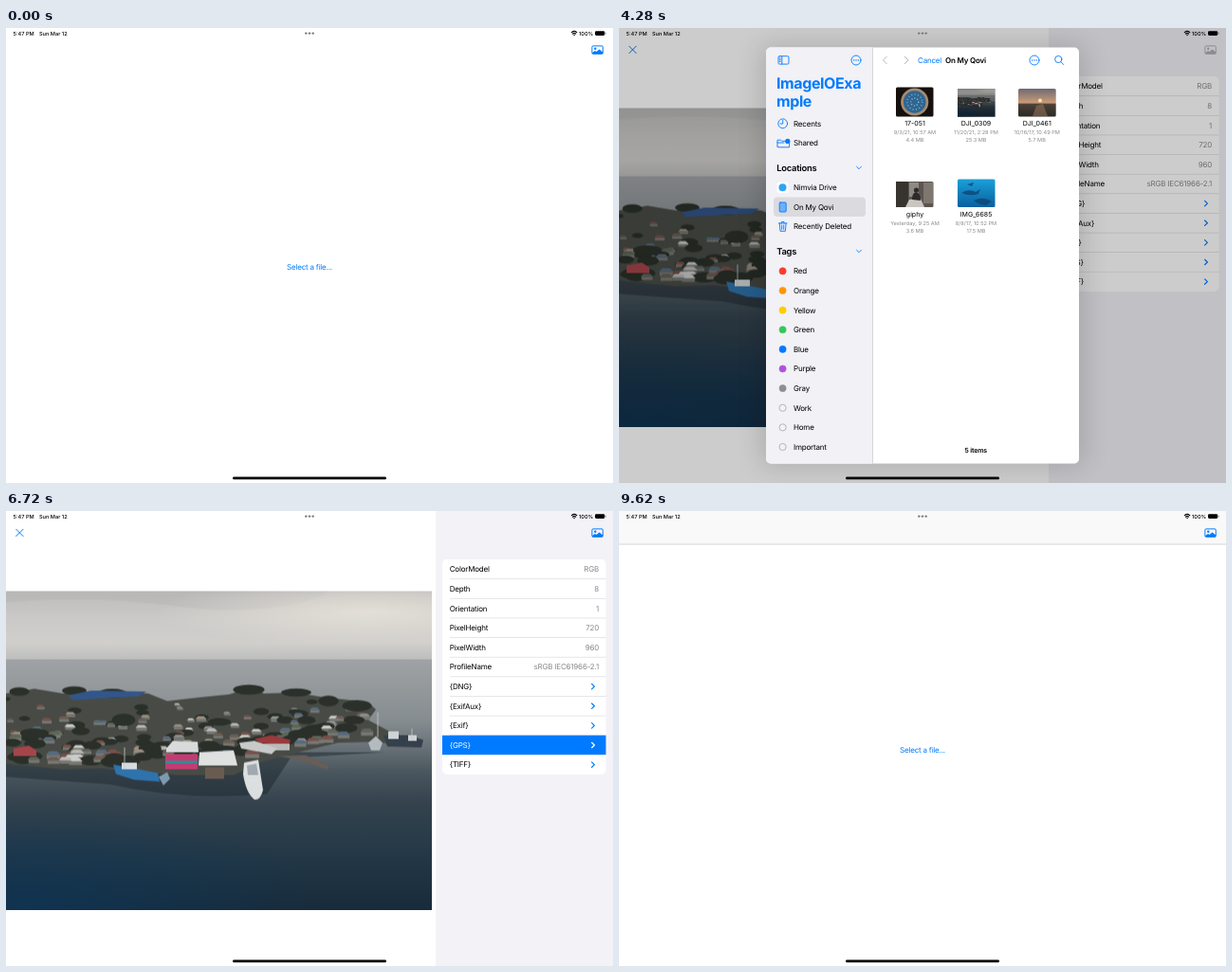
Write an HTML page that moves like this. It is 640 by 480 pixels and loops after 9640 ms.

```html
<!DOCTYPE html>
<html lang="en">
<head>
<meta charset="utf-8">
<title>Image metadata browser</title>
<style>
html, body { margin: 0; width: 100%; height: 100%; overflow: hidden; background: #fff; }
svg { display: block; }
#stage { width: 640px; height: 480px; }
text { font-family: Inter, "Liberation Sans", sans-serif; letter-spacing: -.025em; text-rendering: geometricPrecision; }
.small { letter-spacing: 0; }
.line { fill: none; stroke-linecap: round; stroke-linejoin: round; }
.blue { stroke: #007aff; }

/* one shared 9640 ms clock, held poses */
.dim, .sheet, .files, .picked, .empty, .detail, .pic, .close, .bar, .thumb, .scroll,
.hl, .gps text, .gps .line, .extra, .tiff, .grow {
  animation: 9640ms step-end infinite;
}
.dim { animation-name: dim; }
.sheet { animation-name: sheet; }
.files { animation-name: files; }
.picked { animation-name: picked; }
.empty { animation-name: empty; }
.detail { animation-name: detail; }
.pic { animation-name: pic; }
.close { animation-name: close; }
.bar { animation-name: bar; }
.thumb { animation-name: thumb; }
.scroll { animation-name: scroll; }
.hl { animation-name: hl; }
.gps text { animation-name: label; }
.gps .line { animation-name: arrow; }
.extra { animation-name: extra; }
.tiff { animation-name: tiff; }
.grow { animation-name: grow; }

@keyframes dim {
  0% { opacity: 0; } 13.58% { opacity: .12; } 14.73% { opacity: .5; } 15.87% { opacity: .84; }
  17.01% { opacity: 1; } 45.33% { opacity: .82; } 46.68% { opacity: .43; } 47.71% { opacity: .2; }
  48.85% { opacity: .07; } 49.89%, 100% { opacity: 0; }
}
@keyframes sheet {
  0% { transform: translateY(560px); } 13.58% { transform: translateY(404px); }
  14.73% { transform: translateY(222px); } 15.87% { transform: translateY(72px); }
  17.01% { transform: none; } 45.33% { transform: translateY(82px); }
  46.68% { transform: translateY(261px); } 47.71% { transform: translateY(368px); }
  48.85% { transform: translateY(432px); } 49.89%, 100% { transform: translateY(560px); }
}
@keyframes files { 0% { opacity: 0; } 22.4% { opacity: .5; } 23.54%, 100% { opacity: 1; } }
@keyframes picked { 0% { opacity: 0; } 43.04% { opacity: .3; } 45.33%, 100% { opacity: 0; } }
@keyframes empty { 0% { opacity: 1; } 44.19% { opacity: 0; } 99.79%, 100% { opacity: 1; } }
@keyframes detail { 0% { opacity: 0; } 44.19% { opacity: 1; } 99.79%, 100% { opacity: 0; } }
@keyframes pic { 0% { color: #007aff; } 13.58% { color: #b0b0b0; } 45.33%, 100% { color: #007aff; } }
@keyframes close { 0% { opacity: 1; } 98.54%, 100% { opacity: .3; } }
@keyframes bar { 0% { opacity: 0; } 78.94%, 100% { opacity: 1; } }
@keyframes thumb {
  0% { opacity: 0; transform: translateY(-30px); } 78.94% { opacity: 1; transform: translateY(-24px); }
  80.08% { opacity: 1; transform: translateY(-14px); } 81.22% { opacity: 1; transform: translateY(-5px); }
  82.57% { opacity: 1; transform: none; } 85.68% { opacity: .45; transform: none; }
  87.55%, 100% { opacity: 0; transform: none; }
}
@keyframes scroll {
  0% { transform: none; } 78.94% { transform: translateY(-7px); } 80.08% { transform: translateY(-18px); }
  81.22% { transform: translateY(-28px); } 82.57%, 100% { transform: translateY(-33.5px); }
}
@keyframes hl { 0% { opacity: 0; } 69.7% { opacity: 1; } 70.85%, 100% { opacity: 0; } }
@keyframes label { 0% { fill: #000; } 69.7% { fill: #fff; } 70.85%, 100% { fill: #000; } }
@keyframes arrow {
  0% { stroke: #007aff; transform: none; } 69.7% { stroke: #fff; transform: none; }
  70.85% { stroke: #007aff; transform: rotate(40deg); } 71.99%, 100% { stroke: #007aff; transform: rotate(90deg); }
}
@keyframes extra { 0% { opacity: 0; } 70.85% { opacity: .4; } 71.99% { opacity: .85; } 73.02%, 100% { opacity: 1; } }
@keyframes tiff {
  0% { transform: none; } 70.85% { transform: translateY(80px); }
  71.99% { transform: translateY(168px); } 73.02%, 100% { transform: translateY(195.2px); }
}
@keyframes grow { 0% { height: 227px; } 70.85% { height: 307px; } 71.99% { height: 395px; } 73.02%, 100% { height: 422.2px; } }
</style>
</head>
<body>
<svg id="stage" viewBox="0 0 640 480" width="640" height="480">
  <defs>
    <linearGradient id="sky" x2="0" y2="1">
      <stop offset="0" stop-color="#bdbcbb"/><stop offset=".4" stop-color="#cbcac8"/>
      <stop offset=".75" stop-color="#d0cfcc"/><stop offset="1" stop-color="#bdbdbd"/>
    </linearGradient>
    <radialGradient id="glow" cx=".85" cy=".3" r=".5">
      <stop offset="0" stop-color="#ebe6dc" stop-opacity=".8"/><stop offset="1" stop-color="#ebe6dc" stop-opacity="0"/>
    </radialGradient>
    <linearGradient id="sea" x2="0" y2="1">
      <stop offset="0" stop-color="#a0a3a5"/><stop offset=".25" stop-color="#858c90"/>
      <stop offset=".45" stop-color="#4a565e"/><stop offset=".57" stop-color="#34434e"/>
      <stop offset=".8" stop-color="#223746"/><stop offset="1" stop-color="#182b3a"/>
    </linearGradient>
    <radialGradient id="deep" cx=".05" cy="1" r=".7">
      <stop offset="0" stop-color="#0d3658" stop-opacity=".75"/><stop offset="1" stop-color="#0d3658" stop-opacity="0"/>
    </radialGradient>
    <linearGradient id="dusk" x2="0" y2="1">
      <stop offset="0" stop-color="#6f6a70"/><stop offset=".5" stop-color="#c99a78"/>
      <stop offset=".56" stop-color="#4b4038"/><stop offset="1" stop-color="#2b2a26"/>
    </linearGradient>
    <linearGradient id="water" x2="0" y2="1">
      <stop offset="0" stop-color="#1aa0d8"/><stop offset="1" stop-color="#0a5f9e"/>
    </linearGradient>
    <clipPath id="frame"><rect width="449" height="336.5"/></clipPath>
    <clipPath id="card"><rect class="grow" x="460" y="51" width="172.5" height="227" rx="5"/></clipPath>
    <clipPath id="round"><rect x="155" y="20.5" width="330" height="439" rx="5"/></clipPath>
    <g id="photo" clip-path="url(#frame)">
      <rect width="449" height="73" fill="url(#sky)"/>
      <path d="M0 12Q90 4 180 16T330 6L340 0H0Z" fill="#aeaeae" opacity=".4"/>
      <rect width="449" height="73" fill="url(#glow)"/>
      <rect y="72" width="449" height="265" fill="url(#sea)"/>
      <rect y="180" width="449" height="157" fill="url(#deep)"/>
      <path d="M0 170H400L300 176L275 214Q190 222 110 204L0 196Z" fill="#1f2a32" opacity=".55"/>
      <path d="M0 108L30 103L60 108L100 105L150 108L170 116L205 112L235 109L258 102L272 108L305 107L335 112L382 117L390 125L382 136L408 150L438 158L415 163L390 159L350 160L300 172L270 180L240 194L180 194L130 190L100 187L60 188L0 182Z" fill="#484b45"/>
      <g id="town"></g>
      <path d="M66 110L90 105L148 106L140 111L70 115Z" fill="#33568a"/>
      <path d="M262 156L280 152L300 157L298 163L268 160Z" fill="#9a3a3c"/>
      <path d="M264 161H299V168H264Z" fill="#b9bab8"/>
      <path d="M246 160L262 158L286 166L280 172L248 166Z" fill="#c8cac9"/>
      <path d="M8 166L24 163L32 168V174H8Z" fill="#a5454a"/>
      <path d="M169 166L176 158L202 159L203 170H169Z" fill="#d8dadb"/>
      <path d="M168 172H202V188H168Z" fill="#c43b72"/>
      <path d="M168 179H202V182H168Z" fill="#2d8f95"/>
      <path d="M204 170L240 168L244 184H203Z" fill="#dfe1e1"/>
      <path d="M210 186H230V198H210Z" fill="#6a5b50"/>
      <path d="M251 181L266 178L271 210Q268 221 262 220Q253 213 250 193Z" fill="#dcdfe0"/>
      <path d="M254 184L264 182L266 194H255Z" fill="#9ea8ae"/>
      <path d="M113 183L135 187L160 192L162 201L135 199L116 193Z" fill="#2f73ad"/>
      <path d="M122 181H138V188H122Z" fill="#d5dadd"/>
      <path d="M161 196L170 191L173 198L166 205Z" fill="#7f9aae"/>
      <path d="M288 174L316 173L341 185L338 188L312 179Z" fill="#665e57"/>
      <path d="M398 152H424L440 157L438 165L402 164Z" fill="#34404c"/>
      <path d="M403 148H414V156H403ZM424 152H433V158H424Z" fill="#cfd3d5"/>
      <path d="M382 160L390 153L397 160L394 168H385Z" fill="#b4bbbf"/>
      <path d="M392 128V154M428 145V158M125 165V188" stroke="#c8cbcc" stroke-width=".8"/>
    </g>
    <g id="more" class="line"><circle r="5" stroke-width=".9"/><path d="M-2.3 0h.01M0 0h.01M2.3 0h.01" stroke-width="1.4"/></g>
  </defs>

  <rect width="640" height="480" fill="#fff"/>
  <g class="empty" id="empty"></g>

  <g class="detail">
    <use href="#photo" y="84.5"/>
    <rect x="453" width="187" height="480" fill="#f2f2f7"/>
    <g class="scroll"><g clip-path="url(#card)" id="list"></g></g>
    <rect class="thumb" x="636.8" y="68" width="1.6" height="406" rx=".8" fill="#858589"/>
  </g>
  <g class="bar"><rect width="640" height="35" fill="#f9f9f9"/><rect y="34.7" width="640" height=".7" fill="#c4c4c6"/></g>
  <g class="detail"><path class="line blue close" d="M10.7 19.2L18.1 26.6M18.1 19.2L10.7 26.6" stroke-width="1"/></g>
  <g class="pic">
    <rect x="617.9" y="18.9" width="11.4" height="8.4" rx="1.2" fill="none" stroke="currentColor"/>
    <circle cx="621.3" cy="21.8" r="1.2" fill="currentColor"/>
    <path d="M618 26.2L621 24L622.6 25L625.6 22.4L629.2 25.6V27.3H618Z" fill="currentColor"/>
  </g>

  <g class="dim"><rect width="640" height="480" opacity=".2"/></g>

  <g class="sheet">
    <rect x="150" y="18" width="340" height="444" rx="8" opacity=".15" style="filter:blur(14px)"/>
    <rect x="155" y="20.5" width="330" height="439" rx="5" fill="#fff"/>
    <g class="files" clip-path="url(#round)">
      <rect x="155" y="20" width="112.5" height="440" fill="#f1f1f6"/>
      <rect x="267.2" y="20" width=".7" height="440" fill="#c9c9cd"/>
      <rect x="163" y="178.6" width="97" height="20.4" rx="4" fill="#dadadf"/>
      <g class="line blue" stroke-width=".9">
        <rect x="168" y="29.7" width="11" height="8.4" rx="1.3"/>
        <path d="M171.8 30V38M169.3 32h1M169.3 33.7h1M169.3 35.4h1"/>
        <use href="#more" x="250" y="34"/><use href="#more" x="438" y="34"/>
        <circle cx="463.3" cy="33" r="3.6"/><path d="M466 35.8L468.8 38.6"/>
        <circle cx="172.7" cy="100.8" r="4.9"/><path d="M172.7 97.5V101H170"/>
        <path d="M167 125V118.2H170.6L171.7 119.3H176.5M167 121H174M167 125Q167 125.8 168 125.8H179.6V120"/>
        <rect x="169.2" y="184" width="7" height="10" rx="1" fill="#6fb0fa"/>
        <path d="M168.4 206H177M169.3 206L170 214.3H175.4L176.1 206M171.3 206V204.5H174.1V206M171.7 208V212.4M173.7 208V212.4"/>
        <path d="M250.6 146.3L253 148.7L255.4 146.3M250.6 234.3L253 236.7L255.4 234.3"/>
      </g>
      <circle cx="177.8" cy="119.4" r="2.6" fill="#007aff"/>
      <rect x="166.5" y="162.5" width="12" height="11.5" rx="2.5" fill="#fff"/>
      <circle cx="172.5" cy="168.2" r="4" fill="#2fa4f5"/>
      <path class="line" d="M282.3 30.2L278.5 34L282.3 37.8M301.2 30.2L305 34L301.2 37.8" stroke="#b9b9bd"/>
      <g id="side"></g>

      <rect x="292" y="62.5" width="39.5" height="31" rx="1.5" fill="#15100d"/>
      <circle cx="311.7" cy="78" r="14.6" fill="#a48b72"/>
      <circle cx="311.7" cy="78" r="11.8" fill="#2f6591"/>
      <circle cx="311.7" cy="78" r="8" fill="none" stroke="#7fb0c8" stroke-width="1.6" stroke-dasharray="1 2.4"/>
      <circle cx="311.7" cy="78" r="4" fill="none" stroke="#9cc3d2" stroke-width="1.4" stroke-dasharray="1 2"/>
      <use href="#photo" transform="translate(357 64) scale(.0885)"/>
      <rect class="picked" x="357" y="64" width="39.7" height="29.8"/>
      <rect x="421" y="64" width="39.7" height="29.6" rx="1.5" fill="url(#dusk)"/>
      <circle cx="444" cy="76.5" r="2" fill="#ffe3a8"/>
      <path d="M440 82L447 80L452 93H436Z" fill="#a07a5c" opacity=".5"/>
      <rect x="292" y="162" width="39.5" height="27" rx="1.5" fill="#5b5450"/>
      <path d="M292 162H305V189H292Z" fill="#37342f"/>
      <path d="M306 163H316V178H306Z" fill="#8f8a84"/>
      <path d="M321 163H331V185H321Z" fill="#7d7770"/>
      <path d="M302 189L306 181L318 180L322 189Z" fill="#c9c5c0"/>
      <path d="M309 181Q309 174 313 173Q318 174 318 182Z" fill="#2c2a2b"/><circle cx="313.5" cy="171" r="2.6" fill="#2c2a2b"/>
      <rect x="357" y="159.5" width="39.5" height="29.5" rx="1.5" fill="url(#water)"/>
      <path d="M361 174Q368 169 376 173L381 170L379 175Q370 178 361 174ZM374 182Q384 177 393 183L387 187Q380 187 374 182ZM367 165l7-2-2 4Z" fill="#0c4674" opacity=".8"/>
    </g>
  </g>

  <g id="status"></g>
  <g fill="#777"><circle cx="316.3" cy="5.6" r="1.2"/><circle cx="320" cy="5.6" r="1.2"/><circle cx="323.7" cy="5.6" r="1.2"/></g>
  <g class="line" stroke="#000" stroke-width="1.1"><path d="M596.4 4.7Q599.1 2.2 601.8 4.7M597.5 6.1Q599.1 4.6 600.7 6.1"/><path d="M599.1 7.5v.1" stroke-width="1.4"/></g>
  <rect x="621" y="3.2" width="10.3" height="4.8" rx="1.4"/><rect x="631.9" y="4.7" width=".7" height="1.8" rx=".3" fill="#777"/>
  <rect x="239" y="473.6" width="162" height="2.7" rx="1.35"/>
</svg>

<script>
(() => {
const BLUE = '#007aff', GREY = '#8a8a8e', ROW = 20.62;
const fill = (id, parts) => { document.getElementById(id).innerHTML = parts.join(''); };

// text centred vertically on y
function txt(x, y, s, { size = 8, color = '#000', weight = 400, anchor = 'start', cls = '' } = {}) {
  return `<text class="${cls}" x="${x}" y="${(y + size * .36).toFixed(2)}" font-size="${size}" ` +
    `fill="${color}" font-weight="${weight}" text-anchor="${anchor}">${s}</text>`;
}
const value = (y, s) => txt(625, y, s, { color: GREY, anchor: 'end' });
const rule = (x, y) => `<rect x="${x}" y="${y - .35}" width="${633 - x}" height=".7" fill="#dcdce0"/>`;
const arrow = y => `<g transform="translate(619 ${y})"><path class="line blue" stroke-width="1.2" d="M-1.4 -2.7L1.4 0L-1.4 2.7"/></g>`;

fill('empty', [txt(320, 252.6, 'Select a file...', { color: BLUE, anchor: 'middle' })]);
const clock = { size: 5.62, weight: 500, cls: 'small' };
fill('status', [txt(7.5, 5.6, '5:47 PM', clock), txt(35, 5.6, 'Sun Mar 12', clock), txt(604, 5.6, '100%', clock)]);

// metadata list
const centre = i => 61.4 + ROW * i;
const list = ['<rect x="460" y="51" width="173" height="440" fill="#fff"/>'];
[['ColorModel', 'RGB'], ['Depth', 8], ['Orientation', 1], ['PixelHeight', 720], ['PixelWidth', 960],
 ['ProfileName', 'sRGB IEC61966-2.1']].forEach(([name, v], i) => {
  list.push(txt(467.7, centre(i), name), value(centre(i), v), rule(468, centre(i) + ROW / 2));
});
['{DNG}', '{ExifAux}', '{Exif}'].forEach((name, i) => {
  const y = centre(i + 6);
  list.push(txt(467.7, y, name), arrow(y), rule(468, y + ROW / 2));
});

const gpsY = centre(9);
let edge = gpsY + ROW / 2;
list.push('<g class="extra">');
[['Altitude', '43.90000152599533'], ['AltitudeRef', 0], ['GPSVersion', null], ['Latitude', '16.350555'],
 ['LatitudeRef', 'N'], ['Longitude', '86.46083333333333'], ['LongitudeRef', 'W']].forEach(([name, v]) => {
  const h = v === null ? 71.5 : ROW, y = edge + h / 2;
  list.push(txt(477, y, name));
  if (v !== null) list.push(value(y, v));
  else ['(', '2,', '3,', '0,', '0', ')'].forEach((s, i) =>
    list.push(txt(i % 5 ? 617.7 : 609.8, y + (i - 2.5) * 10.25, s, { color: GREY })));
  edge += h;
  list.push(rule(477, edge));
});
list.push('</g>');
list.push('<g class="gps">', `<rect class="hl" x="460" y="${gpsY - ROW / 2}" width="173" height="${ROW}" fill="${BLUE}"/>`,
  txt(467.7, gpsY, '{GPS}'), arrow(gpsY), '</g>', rule(468, gpsY + ROW / 2));
list.push('<g class="tiff">', `<rect x="460" y="${gpsY + ROW / 2 + .4}" width="173" height="${ROW}" fill="#fff"/>`,
  txt(467.7, centre(10), '{TIFF}'), arrow(centre(10)), '</g>');
fill('list', list);

// file picker
const title = { size: 16, weight: 700, color: BLUE }, head = { size: 9.4, weight: 600 };
const side = [
  txt(166, 58.5, 'ImageIOExa', title), txt(166, 77.5, 'mple', title),
  txt(184, 100.8, 'Recents'), txt(184, 121.4, 'Shared'), txt(166.2, 147.2, 'Locations', head),
  txt(184, 168.2, 'Nimvia Drive'), txt(184, 188.8, 'On My Qovi'), txt(184, 209.5, 'Recently Deleted'),
  txt(166.2, 235.2, 'Tags', head),
  txt(315, 33.8, 'Cancel', { color: BLUE }), txt(344, 33.8, 'On My Qovi', { weight: 600 }),
  txt(376.3, 445.8, '5 items', { size: 7.05, weight: 600, anchor: 'middle' })
];
[['Red', '#ff3b30'], ['Orange', '#ff9500'], ['Yellow', '#ffcc00'], ['Green', '#34c759'], ['Blue', BLUE],
 ['Purple', '#af52de'], ['Gray', '#8e8e93'], ['Work'], ['Home'], ['Important']].forEach(([name, c], i) => {
  const y = 256.4 + ROW * i;
  side.push(`<circle cx="172.6" cy="${y}" r="3.6" fill="${c || 'none'}" stroke="${c || '#8e8e93'}" stroke-width=".6"/>`,
    txt(184, y, name));
});
const note = { size: 5.62, color: GREY, anchor: 'middle', cls: 'small' };
[[312, 100.4, '17-051', '9/3/21, 10:57 AM', '4.4 MB'], [376.5, 100.4, 'DJI_0309', '11/20/21, 2:28 PM', '25.3 MB'],
 [440.7, 100.4, 'DJI_0461', '10/16/17, 10:49 PM', '5.7 MB'], [312, 196.5, 'giphy', 'Yesterday, 9:25 AM', '3.6 MB'],
 [376.5, 196.5, 'IMG_6685', '8/8/17, 10:52 PM', '17.5 MB']].forEach(([x, y, name, date, mb]) => {
  side.push(txt(x, y, name, { size: 7.05, anchor: 'middle', cls: 'small' }), txt(x, y + 9.4, date, note), txt(x, y + 17.9, mb, note));
});
fill('side', side);

// trees and houses of the shore town
let seed = 11;
const rnd = () => (seed = (seed * 16807) % 2147483647) / 2147483647;
const roofs = ['#8d8f8e', '#b8b9b7', '#6d5c52', '#566b7d', '#7a4f4a', '#5d6659', '#cccdcb', '#9a8f80'];
const town = [];
for (let i = 0; i < 190; i++) {
  const x = rnd() * 375, d = Math.sqrt(i / 190);
  const low = x < 250 ? 182 : 174 - (x - 250) * .2;
  const y = 112 + d * (low - 116) + rnd() * 4, w = 4 + d * 7 + rnd() * 4;
  if (rnd() < .5) town.push(`<ellipse cx="${x}" cy="${y}" rx="${w * .9}" ry="${w * .4}" fill="#2a3029"/>`);
  else {
    const c = roofs[Math.floor(rnd() * roofs.length)];
    town.push(`<path d="M${x} ${y}l${w * .25} ${-w * .3}h${w * .6}l${w * .3} ${w * .3}z" fill="${c}"/>`,
      `<rect x="${x + 1}" y="${y}" width="${w}" height="${w * .28}" fill="#777874"/>`);
  }
}
[[14, 106], [72, 105], [112, 108], [256, 104], [306, 107], [340, 116], [370, 121], [124, 136], [30, 150], [225, 138]].forEach(([x, y]) =>
  town.push(`<ellipse cx="${x}" cy="${y}" rx="${9 + rnd() * 9}" ry="${4 + rnd() * 3}" fill="#2b312a"/>`));
fill('town', town);
})();
</script>
</body>
</html>
```
